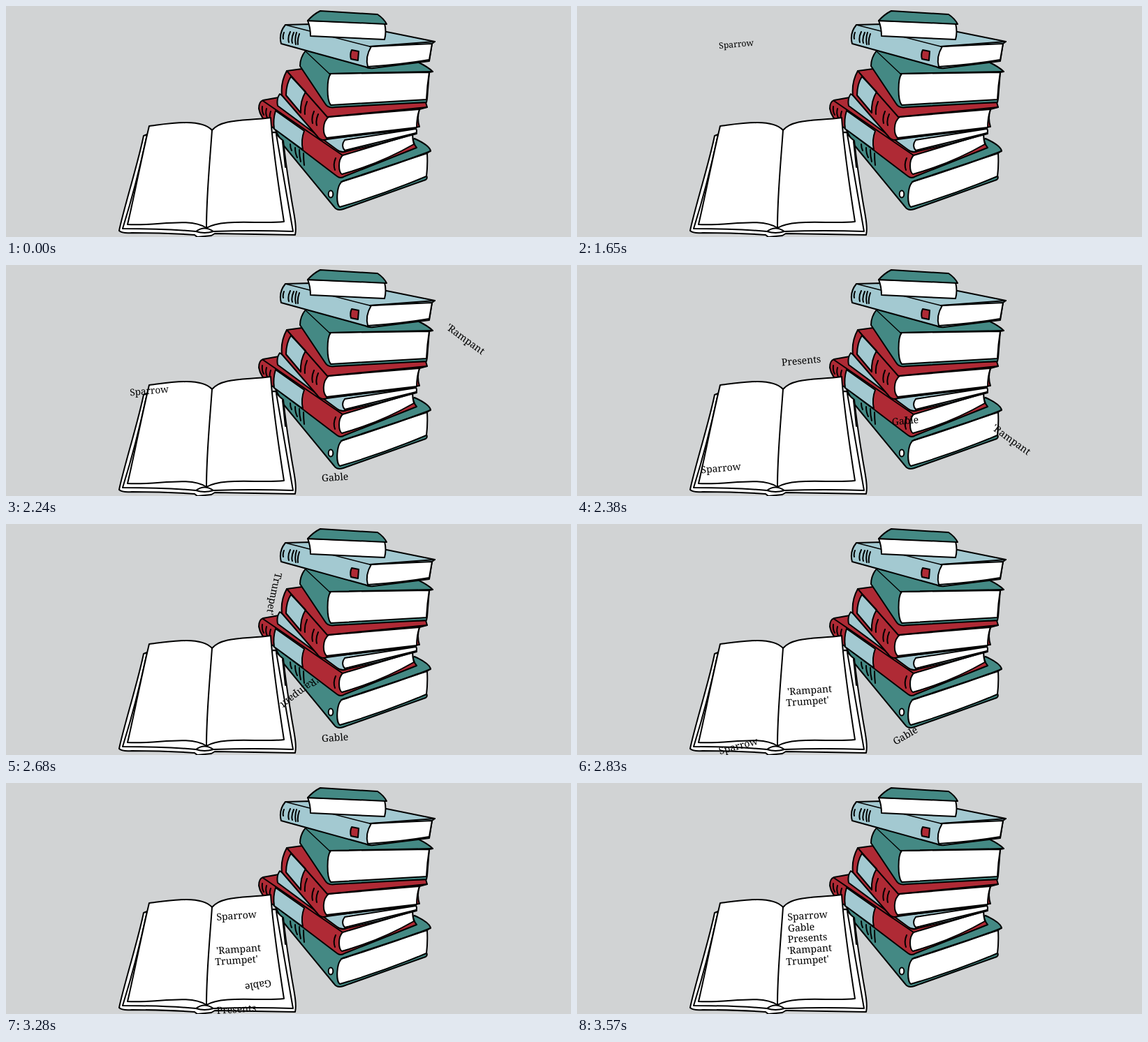
Recreate the animation shown at these times as an HTML page. Size 809 px wide and 331 px high, loop 5220 ms.

```html
<!DOCTYPE html>
<html lang="en">
<head>
<meta charset="utf-8">
<title>Flying words</title>
<style>
html, body { margin: 0; width: 100%; height: 100%; overflow: hidden; background: #d1d3d4; }
svg { display: block; width: 100%; height: 100%; }
path, ellipse { stroke: #000; stroke-width: 2; stroke-linejoin: round; stroke-linecap: round; fill: none; }
.teal { fill: #448984; }
.blue { fill: #a3c9d1; }
.red { fill: #af2a35; }
.page { fill: #fff; }
.thin { stroke-width: 1.4; }
text { font-family: "Noto Serif", serif; text-anchor: middle; fill: #000; }
</style>
</head>
<body>
<svg viewBox="0 0 809 331">
  <!-- stack, bottom to top -->
  <g>
    <path class="teal" d="M385 176L396 198L470 288Q474 294 483 291L601 249Q604 247 602 243L603 211L608 207Q605 199 585 190L480 245Z"/>
    <path class="page" d="M603 211L482 251C473 256 472 284 478 288Q540 270 602 244Q604 228 603 211Z"/>
    <path d="M480 252Q545 232 608 208M407 198q0 5 2 9M414 203q0 8 3 14M420 206q0 9 2 17M426 211q0 9 1 17"/>
    <ellipse class="page" cx="465" cy="269.500" rx="3.300" ry="5"/>
  </g>
  <g>
    <path class="red" d="M362 147Q362 137 368 135L396 130L480 206L582 184Q582 196 588 203L485 244Q479 248 474 244L378 171Q364 160 362 147Z"/>
    <path class="blue" d="M386 150L427 179Q422 192 425 206L384 176Q382 163 386 150Z"/>
    <path class="page" d="M582 184L482 214C475 221 476 238 481 241Q535 226 584 198Q582 190 582 184Z"/>
    <path d="M368 136L482 214M367 144q-1 7 2 12M373 147q-2 7 1 13M379 151q-2 6 -1 10M472 218q-4 9 -1 17"/>
  </g>
  <g>
    <path class="blue" d="M392 126Q387 133 389 143L474 206Q480 211 488 208L532 198L588 183L587 176L480 188Z"/>
    <path class="page" d="M587 176L485 192Q479 200 485 207L587 182Q589 179 587 176Z"/>
  </g>
  <g>
    <path class="red" d="M402 93L424 90L464 142L601 138L603 145L592 148Q588 161 592 173L460 191Q451 194 446 187L395 128Q393 109 402 93Z"/>
    <path class="blue" d="M408 101L429 123Q421 136 422 153L401 128Q401 112 408 101Z"/>
    <path class="page" d="M592 148L462 159C453 166 453 183 459 189L588 174Q588 160 592 148Z"/>
    <path d="M402 93L460 159L603 145M431 137q-4 9 -3 18M441 151q-4 9 -2 17M447 155q-4 9 -2 16"/>
  </g>
  <g>
    <path class="teal" d="M429 64Q421 74 421 86L457 140Q461 147 472 145L602 138L603 133L606 95L611 94Q604 87 589 80L520 60Z"/>
    <path class="page" d="M606 95L465 97C459 104 459 135 465 142Q535 138 602 134Q603 114 606 95Z"/>
    <path d="M463 97L611 94"/><path class="thin" d="M429 65L463 97"/>
  </g>
  <g>
    <path class="blue" d="M400 27L436 26L545 37L614 51L610 54L606 79L526 89Q520 90 514 87L394 54Q390 39 400 27Z"/>
    <path class="page" d="M610 54L523 58Q514 73 518 87Q565 84 606 77Z"/>
    <path d="M521 58L614 51M398 38q-2 5 -1 9M407 37q-4 8 -2 15M412 38q-4 9 -2 15M416 38q-3 9 -1 17M420 40q-3 8 -2 15"/>
    <path class="thin" d="M400 27L521 58"/>
    <path class="red" d="M495 63L505 65L504 78L494 76Q492 69 495 63Z"/>
  </g>
  <g>
    <path class="page" d="M432 21Q436 31 436 43L542 48Q545 37 542 25Z"/>
    <path class="teal" d="M450 7Q440 12 432 21L545 26Q541 18 532 12Z"/>
  </g>
  <!-- open book -->
  <g>
    <path class="page" d="M202 184L197 186C190 222 168 292 162 322Q166 326 180 325Q230 325 270 328L274 331L294 329L299 326L414 328C417 315 411 293 408 272Q401 230 397 193Q389 187 386 181Z"/>
    <path d="M202 184Q187 255 167 319Q230 319 272 323Q284 314 297 323Q355 321 411 323L387 184M272 323Q284 327 297 323"/>
    <path d="M396 194L400 231" stroke-width="3"/>
    <path class="page" d="M205 172C230 169 278 160 295 178C309 161 344 165 379 160C382 205 392 270 398 309C365 313 310 304 287 318C262 302 215 316 174 313C182 280 190 236 205 172Z"/>
    <path d="M295 178C292 222 287 270 287 318"/>
  </g>
  <g id="words"></g>
</svg>
<script>
const LOOP = 5220;
const words = ["Sparrow", "Gable", "Presents", "'Rampant", "Trumpet'"];
const home = [[330, 190, -4], [321, 207, -4], [330, 222, -4], [333, 238, -4], [330, 254, -4]];
const [A, B, C, D, E] = home;

// Each step: start time, then one pose per word: x, y, angle, size (0 = hidden)
const steps = [
  [0],
  [1650, [228, 54, -5, 12.2]],
  [1800, [210, 251, -5, 13]],
  [1950, [220.5, 134, -5, 12.9], [472, 319, -4]],
  [2090, [220, 212, -5, 13.3], [471, 262, -4]],
  [2240, [205, 180, -5, 13.6], [471, 304, -4], 0, [658, 106, 36]],
  [2380, [206, 291, -5], [470, 223, -5], [321, 137, -5], [622, 250, 36]],
  [2530, 0, [471, 265, -4], [320, 222, -5], [548, 262, 80]],
  [2680, 0, [471, 306, -4], 0, [420, 242, 143], [384, 100, 102]],
  [2830, [231, 318, -15], [470, 303, -30], 0, D, E],
  [2980, [260, 312, -45], [447, 306, -80], 0, D, E],
  [3130, [314, 209, -88], [425, 299, -134], 0, D, E],
  [3280, A, [361, 290, -190], [330, 324, -4], D, E],
  [3430, A, B, [330, 300, -4], D, E],
  [3570, A, B, C, D, E]
];

const layer = document.getElementById("words");
const labels = words.map(word => {
  const label = document.createElementNS(layer.namespaceURI, "text");
  label.textContent = word;
  label.setAttribute("y", 5);
  return layer.appendChild(label);
});

function draw(now) {
  const time = now % LOOP;
  const [, ...poses] = steps.findLast(step => step[0] <= time);
  labels.forEach((label, i) => {
    const pose = poses[i];
    label.setAttribute("visibility", pose ? "visible" : "hidden");
    if (!pose) return;
    const [x, y, angle, size = 14] = pose;
    label.setAttribute("transform", `translate(${x} ${y}) rotate(${angle})`);
    label.setAttribute("font-size", size);
  });
}

const start = performance.now();
function tick() {
  draw(performance.now() - start);
  requestAnimationFrame(tick);
}
tick();
</script>
</body>
</html>
```
